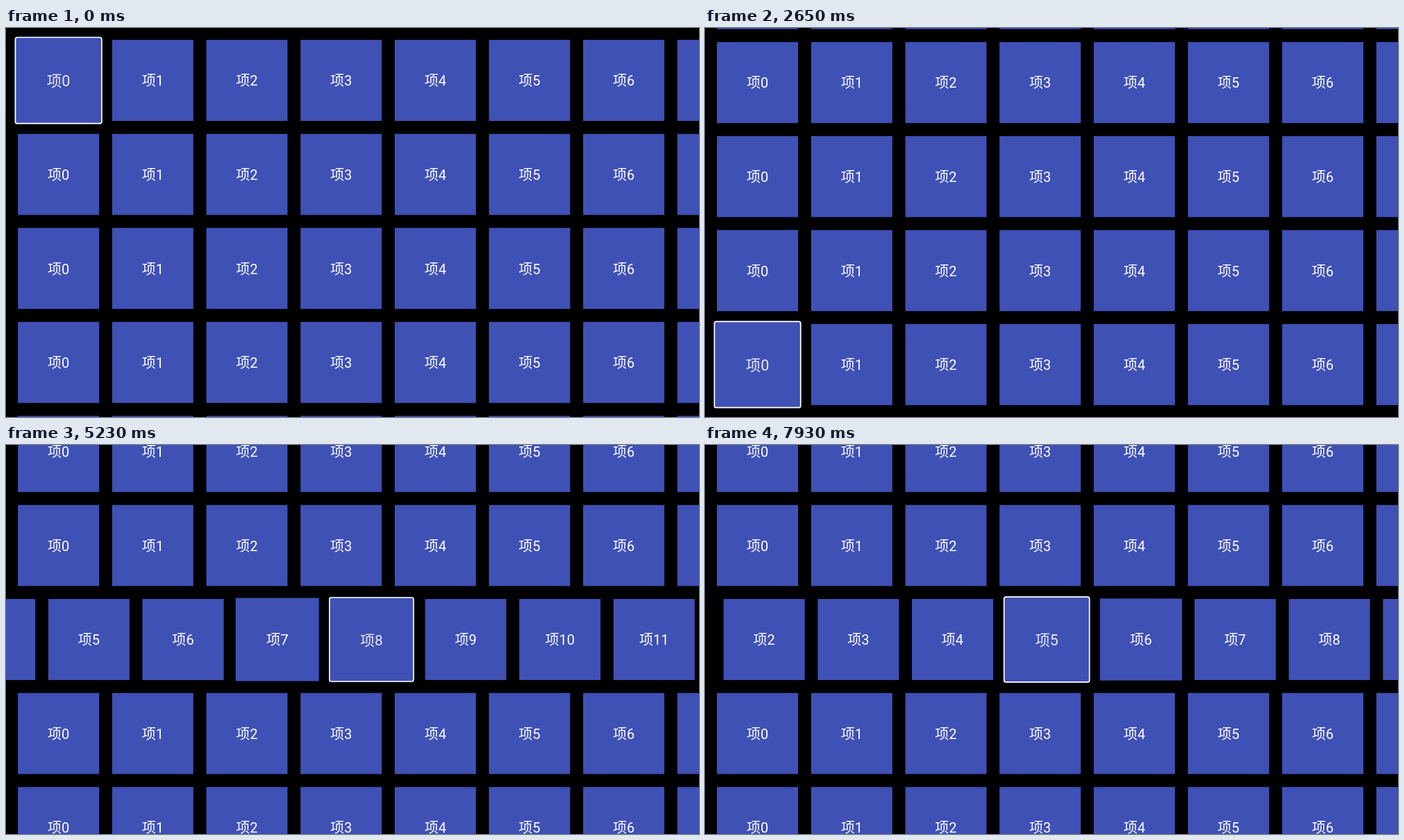
An HTML page for the animation above (8000 ms loop, 998 by 561 pixels).

```html
<!DOCTYPE html>
<html lang="zh-CN">
<head>
<meta charset="utf-8">
<title>Focus grid</title>
<style>
  html, body { margin: 0; width: 100%; height: 100%; overflow: hidden; background: #000; }
  svg { display: block; width: 100%; height: 100%; }
  text {
    font: 38.5px Roboto, "Noto Sans CJK SC", "Noto Sans CJK", sans-serif;
    fill: #fff; text-anchor: middle;
  }
  .tile { fill: #3f51b5; }
  .ring { fill: none; stroke: #fff; stroke-width: 3; visibility: hidden; }
  .focused .ring { visibility: visible; }
  .focused text { fill-opacity: .88; }
</style>
</head>
<body>
<svg id="stage" viewBox="0 0 1920 1080" preserveAspectRatio="none"></svg>
<script>
const LOOP = 8000, STEP = 142;
const WIDTH = 1920, HEIGHT = 1080;
const ROWS = 5, COLS = 13, SIZE = 225, PITCH = 261, PAD = 33;
const SLIVER = 23;
const GROWTH = 0.077;
const SCALE_RATE = 0.023, SCROLL_RATE = 0.032;

// Bursts of key presses
const bursts = [
  { at: 800, row: 1 },
  { at: 1510, row: 1, count: 3, every: 430 },
  { at: 3190, row: -1, count: 2, every: 200 },
  { at: 3815, col: 1 },
  { at: 4109, col: 1, count: 9, every: 150 },
  { at: 5740, col: -1 },
  { at: 6395, col: -1 },
  { at: 7340, col: -1, count: 3, every: 210 }
];

// Focus positions over time
const moves = [{ time: 0, row: 0, col: 0 }];
for (const { at, row = 0, col = 0, count = 1, every = 0 } of bursts)
  for (let i = 0; i < count; i++) {
    const last = moves[moves.length - 1];
    moves.push({ time: at + i * every, row: last.row + row, col: last.col + col });
  }

const stage = document.getElementById("stage");

function add(parent, tag, attrs = {}) {
  const el = document.createElementNS("http://www.w3.org/2000/svg", tag);
  for (const key in attrs) el.setAttribute(key, attrs[key]);
  return parent.appendChild(el);
}

function box(parent, name, inset) {
  const side = SIZE - 2 * inset;
  return add(parent, "rect", { class: name, x: -side / 2, y: -side / 2, width: side, height: side });
}

function makeItem(row, col) {
  const group = add(stage, "g");
  const tile = box(group, "tile", 0);
  box(group, "ring", 1.5).setAttribute("rx", 5);
  add(group, "text", { y: 15 }).textContent = "项" + col;
  return { row, col, group, tile };
}

const items = [];
for (let row = 0; row < ROWS; row++)
  for (let col = 0; col < COLS; col++) items.push(makeItem(row, col));

const center = i => PAD + SIZE / 2 + i * PITCH;

// Scroll offset that centres an entry, limited to the ends of the list
function offset(i, count, view) {
  const end = 2 * PAD + SIZE + (count - 1) * PITCH - view;
  return Math.min(Math.max(center(i) - view / 2, 0), end);
}

// Step response of a critically damped spring
function spring(t, rate) {
  return 1 - (1 + rate * t) * Math.exp(-rate * t);
}

// Sum of the spring responses to every change of a value along the past moves
function follow(past, time, rate, value) {
  let last = value(past[0]), result = last;
  for (const move of past) {
    const next = value(move);
    result += (next - last) * spring(time - move.time, rate);
    last = next;
  }
  return result;
}

function draw(time) {
  const past = moves.filter(m => m.time <= time);
  const focus = past[past.length - 1];
  const scrollX = follow(past, time, SCROLL_RATE, m => offset(m.col, COLS, WIDTH));
  const scrollY = follow(past, time, SCROLL_RATE, m => offset(m.row, ROWS, HEIGHT));

  for (const { row, col, group, tile } of items) {
    const focused = row === focus.row && col === focus.col;
    const lift = follow(past, time, SCALE_RATE, m => +(m.row === row && m.col === col));
    const x = center(col) - (row === 2 ? scrollX : 0);
    const y = center(row) - scrollY;
    const scale = 1 + GROWTH * lift;
    // Tiles join a row only once enough of them is inside the view
    const inside = Math.min(x + SIZE / 2, WIDTH - x + SIZE / 2);
    group.setAttribute("display", inside < SLIVER ? "none" : "inline");
    group.setAttribute("transform", `translate(${x.toFixed(2)} ${y.toFixed(2)}) scale(${scale.toFixed(4)})`);
    group.setAttribute("class", focused ? "focused" : "");
    tile.setAttribute("rx", focused ? 6 : 0);
  }
}

// The picture is refreshed in even steps, counted from the start of each burst
function snap(time) {
  const started = bursts.filter(b => b.at <= time).pop();
  const from = started ? started.at : 0;
  return from + Math.floor((time - from) / STEP) * STEP;
}

const start = performance.now();
let shown = -1;

function frame() {
  const time = snap((performance.now() - start) % LOOP);
  if (time !== shown) draw(shown = time);
  requestAnimationFrame(frame);
}
frame();
</script>
</body>
</html>
```
